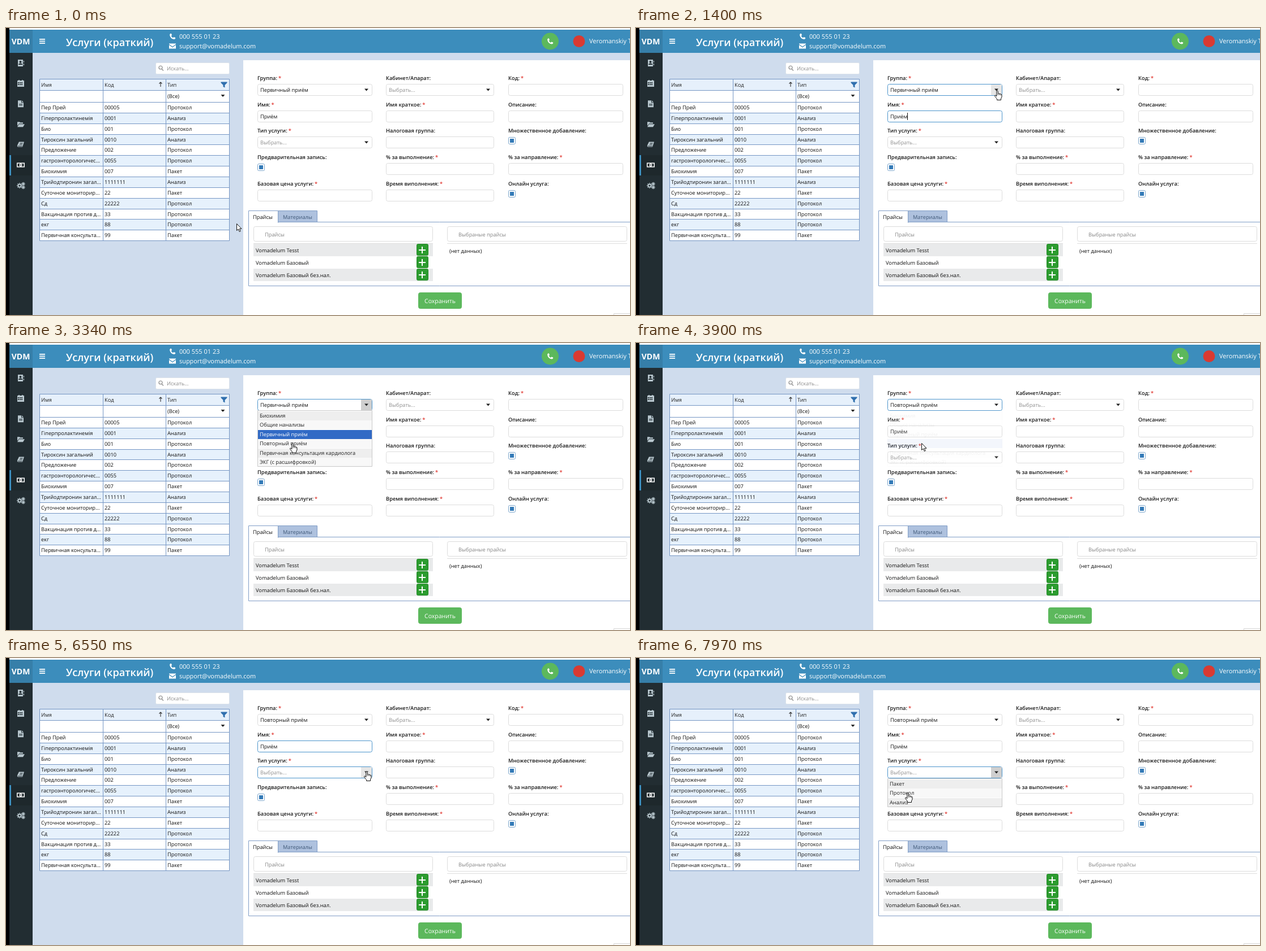
An HTML page with a canvas that plays this animation: 1102 px wide and 508 px high, repeating every 8 s.

```html
<!DOCTYPE html>
<html lang="ru">
<head>
<meta charset="utf-8">
<title>Услуги</title>
<style>
html, body { margin: 0; width: 100%; height: 100%; overflow: hidden; background: #fff; }
canvas { display: block; width: 1102px; height: 508px; }
</style>
</head>
<body>
<canvas id="stage" width="1102" height="508"></canvas>
<script>
const ctx = document.getElementById('stage').getContext('2d');
const LOOP = 8000, BLUE = '#3c8dbc', FOCUS = '#4b94cb', LINE = '#dcdcdc', GRID = '#7596c4';

function rect(x, y, w, h, color) {
  ctx.fillStyle = color;
  ctx.fillRect(x, y, w, h);
}

function box(x, y, w, h, fill, border, radius = 0) {
  ctx.beginPath();
  ctx.roundRect(x + .5, y + .5, w - 1, h - 1, radius);
  if (fill) { ctx.fillStyle = fill; ctx.fill(); }
  if (border) { ctx.strokeStyle = border; ctx.lineWidth = 1; ctx.stroke(); }
}

// y is the middle of the capital letters
function text(s, x, y, color = '#111', size = 9.25, weight = 400, align = 'left') {
  ctx.font = `${weight} ${size}px "Open Sans", "Noto Sans", sans-serif`;
  ctx.textAlign = align;
  ctx.fillStyle = color;
  ctx.fillText(s, x, y + size * .36);
  return ctx.measureText(s).width;
}

function shape(path, x, y, fill, stroke, width = 1) {
  ctx.save();
  ctx.translate(x, y);
  const p = new Path2D(path);
  if (fill) { ctx.fillStyle = fill; ctx.fill(p, 'evenodd'); }
  if (stroke) { ctx.strokeStyle = stroke; ctx.lineWidth = width; ctx.stroke(p); }
  ctx.restore();
}

function disc(x, y, r, color) {
  ctx.beginPath();
  ctx.arc(x, y, r, 0, 7);
  ctx.fillStyle = color;
  ctx.fill();
}

const caretDown = (x, y) => shape('M-3.5-2H3.5L0 2Z', x, y, '#222');
const HANDSET = 'M-5-3Q-4-6-2-5L-1-2-2.5-1Q-1 1.5 1 2.5L2.2 1 5 2Q6 4 3 5Q-4 4-5-3Z';

const MENU = [
  'M-5-6H4V6H-5ZM5-4H6V-1H5ZM5 1H6V4H5ZM-2.5-2A2 2 0 0 0 1.5-2A2 2 0 0 0-2.5-2M-4 3H3Q3 .5-.5.5Q-4 .5-4 3Z',
  'M-6-5H-4V-6H-2V-5H2V-6H4V-5H6V6H-6ZM-5-2V0H-3V-2ZM-2-2V0H0V-2ZM1-2V0H3V-2ZM-5 1V3H-3V1ZM-2 1V3H0V1ZM1 1V3H3V1Z',
  'M-5-6H1V-2H5V6H-5ZM2-6L5-3H2ZM-3 0V1H3V0ZM-3 2V3H3V2Z',
  'M-6-4H-2L-1-3H4V-1H-3L-6 3ZM-3 0H7L4 5H-6Z',
  'M-3-5H6L3 4H-5Q-7 3-5.5 0ZM-1-3L-1.4-2H3.4L3.8-3ZM-2-.8L-2.3 0H2.6L3-.8ZM-5 2V3H2.4L2.8 2Z',
  'M-7-4H7V4H-7ZM-5.5-2.5V2.5H5.5V-2.5ZM-2.5 0A2.5 2.5 0 0 0 2.5 0A2.5 2.5 0 0 0-2.5 0M-.5-1.5H.5V1.5H-.5Z'
];

function gear(x, y, r) {
  ctx.strokeStyle = '#b8c7ce';
  ctx.lineWidth = 2;
  ctx.beginPath();
  ctx.arc(x, y, r - 1, 0, 7);
  ctx.stroke();
  ctx.lineWidth = 1.3;
  for (let i = 0; i < 8; i++) {
    const c = Math.cos(i * Math.PI / 4), s = Math.sin(i * Math.PI / 4);
    ctx.beginPath();
    ctx.moveTo(x + c * r, y + s * r);
    ctx.lineTo(x + c * (r + 1.3), y + s * (r + 1.3));
    ctx.stroke();
  }
}

function drawFrame() {
  rect(0, 0, 1102, 508, '#cfdced');
  rect(0, 0, 1102, 3, '#fff');
  rect(6, 3, 1096, 41, BLUE);
  rect(6, 3, 41, 41, '#367fa9');
  rect(6, 44, 41, 464, '#222d32');
  rect(0, 0, 6, 508, '#000');
  text('VDM', 26, 23.5, '#fff', 14, 700, 'center');
  for (let i = 0; i < 3; i++) rect(59, 19 + i * 3.5, 10, 1.8, '#fff');
  text('Услуги (краткий)', 106, 25, '#fff', 18.2, 600);
  shape(HANDSET, 294, 15, '#fff');
  text('000 555 01 23', 306, 15.5, '#fff', 11);
  shape('M-6-4.5H6V-3.5L0 1-6-3.5ZM-6-2L0 2.4 6-2V4.5H-6Z', 294, 32, '#fff');
  text('support@vomadelum.com', 306, 32, '#fff', 10.9);
  disc(961, 23.5, 15, '#5cb85c');
  shape(HANDSET, 961, 23.5, '#fff');
  disc(1012, 23.5, 10.5, '#d93a32');
  text('Veromanskiy T', 1030, 23.5, '#fff', 11);

  rect(6, 225, 41, 36, '#1e282c');
  rect(6, 225, 3, 36, BLUE);
  MENU.forEach((p, i) => shape(p, 26, 62 + i * 36.1, i === 5 ? '#fff' : '#b8c7ce'));
  gear(24, 279, 3.6);
  gear(30.5, 276, 1.9);
  gear(30.5, 282, 1.9);
}

const ROWS = [
  ['Пер Прей', '00005', 'Протокол'], ['Гіперпролактинемія', '0001', 'Анализ'],
  ['Био', '001', 'Протокол'], ['Тироксин загальний', '0010', 'Анализ'],
  ['Предложение', '002', 'Протокол'], ['гастроэнторологичес...', '0055', 'Протокол'],
  ['Биохимия', '007', 'Пакет'], ['Трийодтиронин загал...', '1111111', 'Анализ'],
  ['Суточное мониторир...', '22', 'Пакет'], ['Сд', '22222', 'Протокол'],
  ['Вакцинация против д...', '33', 'Протокол'], ['екг', '88', 'Протокол'],
  ['Первичная консульта...', '99', 'Пакет']
];

function drawTable() {
  box(264, 61, 131, 21, '#fff', '#dbe2ea', 2);
  shape('M3-1A3 3 0 1 0-3-1A3 3 0 1 0 3-1M2 1.5L5 4.5', 273, 71, null, '#8a8a8a', 1.2);
  text('Искать...', 284, 72, '#8a8a8a');

  const cols = [62, 174, 285], step = 18.85;
  rect(59, 91, 336, 285, '#fff');
  rect(59, 91, 336, 19, '#e6f0fb');
  ['Имя', 'Код', 'Тип'].forEach((s, i) => text(s, cols[i], 101, '#222'));
  shape('M0 4V-4M-2.5-1.5L0-4 2.5-1.5', 273, 100, null, '#333', 1.1);
  shape('M-5.5-5H5.5V-3.5L1.5 .5V5L-1.5 3.5V.5L-5.5-3.5Z', 385, 100.5, '#2f6fae');
  text('(Все)', 285, 120.5);
  caretDown(383, 120);
  ROWS.forEach((row, i) => {
    const y = Math.round(131 + i * step);
    if (i % 2) rect(59, y, 336, 19, '#e6f1fc');
    rect(59, y, 336, 1, GRID);
    row.forEach((s, c) => text(s, cols[c], y + 10));
  });
  rect(59, 110, 336, 1, GRID);
  rect(171, 91, 1, 285, GRID);
  rect(282, 91, 1, 285, GRID);
  box(59, 90, 336, 287, null, GRID);
}

const COLS = [[444, 203], [671, 191], [887, 203]];
const rowTop = r => Math.round(99 + r * 46.7);

function label(s, c, r, required) {
  const x = COLS[c][0], y = 88.5 + r * 46.75;
  const w = text(s, x, y, '#1a1a1a', 9.3, 600);
  if (required) text('*', x + w + 2, y, '#e0332c', 9.3, 600);
}

function field(c, r, value = '', o = {}) {
  const [x, w] = COLS[c], y = rowTop(r);
  box(x, y, w, 21, '#fff', o.active ? FOCUS : LINE, 3);
  if (o.button) rect(x + w - 20, y + 1, 19, 19, o.button);
  if (o.combo) caretDown(x + w - 10.5, y + 10.5);
  text(value, x + 5, y + 11, o.hint ? '#8f8f8f' : '#111');
}

function check(c, r) {
  const x = COLS[c][0], y = rowTop(r) + 1;
  box(x, y, 13, 13, '#fff', '#7ba5cb', 2);
  rect(x + 3, y + 3, 7, 7, '#337ab7');
}

function drawList(x, y, items, selected, alpha) {
  const step = 16.5, h = items.length * step;
  ctx.globalAlpha = alpha;
  rect(x, y, 203, h + 1, '#fff');
  items.forEach((s, i) => {
    const on = i === selected, top = Math.round(y + .5 + i * step);
    rect(x, top, 203, 16, on ? '#316ac5' : i % 2 ? '#f8f8f8' : '#eeeeee');
    text(s, x + 4, y + 8.5 + i * step, on ? '#fff' : '#222');
  });
  box(x, y - 1, 203, Math.round(h) + 1, null, '#c9c9c9');
  ctx.globalAlpha = 1;
}

const GROUPS = ['Биохимия', 'Общие нанализы', 'Первичный приём', 'Повторный приём',
  'Первичная консультация кардиолога', 'ЭКГ (с расшифровкой)'];
const TYPES = ['Пакет', 'Протокол', 'Анализ'];
const within = (t, a, b) => t >= a && t < b;

function drawForm(t) {
  rect(419, 57, 683, 451, '#fff');
  label('Группа:', 0, 0, true);
  label('Кабинет/Апарат:', 1, 0);
  label('Код:', 2, 0, true);
  label('Имя:', 0, 1, true);
  label('Имя краткое:', 1, 1, true);
  label('Описание:', 2, 1);
  label('Тип услуги:', 0, 2, true);
  label('Налоговая группа:', 1, 2);
  label('Множественное добавление:', 2, 2);
  label('Предварительная запись:', 0, 3);
  label('% за выполнение:', 1, 3, true);
  label('% за направление:', 2, 3, true);
  label('Базовая цена услуги:', 0, 4, true);
  label('Время виполнения:', 1, 4, true);
  label('Онлайн услуга:', 2, 4);

  const groupButton = within(t, 1530, 3760) ? '#cfcfcf' : within(t, 1100, 1530) && '#e6e6e6';
  const picked = t < 3620 ? 2 : 3;
  field(0, 0, GROUPS[picked], { combo: true, active: within(t, 1100, 4730), button: groupButton });
  field(1, 0, 'Выбрать...', { combo: true, hint: true });
  field(0, 1, 'Приём', { active: within(t, 290, 1530) || within(t, 4730, 6840) });
  const typeButton = t >= 6840 ? '#cfcfcf' : t >= 6270 && '#e6e6e6';
  field(0, 2, 'Выбрать...', { combo: true, hint: true, active: t >= 6270, button: typeButton });
  [[2, 0], [1, 1], [2, 1], [1, 2], [1, 3], [2, 3], [0, 4], [1, 4]].forEach(([c, r]) => field(c, r));
  check(2, 2);
  check(0, 3);
  check(2, 4);

  const caret = [[290, 830], [1400, 1530], [4730, 5290], [5840, 6410]];
  if (caret.some(([a, b]) => within(t, a, b))) rect(479, 150, 1, 13, '#111');

  const alpha = within(t, 1530, 3760) ? 1 : within(t, 3760, 3900) ? .5 : within(t, 3900, 4040) ? .06 : 0;
  if (alpha) drawList(444, 120, GROUPS, picked, alpha);
  if (t >= 6840) drawList(444, 214, TYPES, -1, 1);
}

function drawPrices() {
  const edge = '#809dc6';
  box(428, 343, 680, 114, '#fff', edge);
  box(480, 323, 70, 21, '#aec1de', edge);
  box(428, 323, 53, 22, '#fff', edge);
  rect(429, 343, 51, 3, '#fff');
  text('Прайсы', 436, 334.5);
  text('Материалы', 489, 334.5, '#3f5878');

  box(437, 351, 317, 27, '#fff', LINE, 3);
  text('Прайсы', 457, 365.5, '#858585');
  box(779, 351, 318, 27, '#fff', LINE, 3);
  text('Выбраные прайсы', 799, 365.5, '#858585');
  rect(779, 381, 318, 1, '#dedede');
  text('(нет данных)', 783, 394.5);

  ['Tesst', 'Базовый', 'Базовый без.нал.'].forEach((s, i) => {
    const y = 382 + i * 22;
    rect(437, y, 317, 22, i % 2 ? '#fff' : '#e9eaeb');
    text('Vomadelum ' + s, 441, y + 11.5);
    box(725, y, 21, 21, '#2c9c2f', '#238a27', 2);
    rect(729, y + 10, 12, 2, '#fff');
    rect(734, y + 5, 2, 12, '#fff');
  });
  rect(437, 381, 317, 1, '#dedede');

  box(728, 468, 77, 29, '#5cb85c', '#5cb85c', 3);
  text('Сохранить', 766.5, 483, '#fff', 10.5, 400, 'center');
  box(1073, 505, 40, 10, '#fff', '#d5d5d5');
}

// time, x, y, kind: a = arrow, h = hand, i = text beam
const POINTER = [
  [0, 407, 346, 'a'], [150, 440, 240, 'a'], [290, 492, 157, 'i'], [420, 500, 157, 'i'],
  [560, 522, 152, 'i'], [690, 562, 124, 'a'], [830, 604, 97, 'a'], [960, 630, 90, 'a'],
  [1100, 636, 104, 'h'], [1250, 638, 109, 'h'], [1400, 638, 110, 'h'], [1810, 639, 110, 'h'],
  [2090, 636, 125, 'h'], [2230, 620, 160, 'h'], [2370, 590, 195, 'h'], [2510, 560, 208, 'h'],
  [2650, 530, 205, 'h'], [2780, 512, 195, 'h'], [2920, 506, 184, 'h'], [3060, 505, 178, 'h'],
  [3210, 506, 177, 'h'], [3760, 504, 177, 'a'], [4040, 504, 174, 'a'], [4170, 502, 164, 'i'],
  [4320, 499, 160, 'i'], [4460, 497, 158, 'i'], [4590, 495, 157, 'i'],
  [5290, 540, 157, 'i'], [5430, 581, 157, 'i'], [5840, 590, 163, 'i'], [5980, 603, 176, 'a'],
  [6120, 619, 191, 'a'], [6270, 632, 199, 'h'], [6410, 636, 200, 'h'], [6550, 637, 200, 'h'],
  [7270, 630, 205, 'h'], [7410, 600, 222, 'h'], [7550, 556, 233, 'h'], [7690, 516, 237, 'h'],
  [7830, 490, 238, 'h'], [7970, 480, 238, 'h']
];
const ARROW = 'M.5.5V12.5L3.3 10 5.2 14.5 7.2 13.6 5.3 9.3H9Z';
const HAND = 'M-1.2 11V1.5Q0-.3 1.2 1.5V6Q2.8 5 3.8 6.5Q5.4 5.8 6.2 7.2Q8 6.8 8 8.5V12L6.5 15V17.5H-.5V15.5L-4.5 10.5Q-4.6 8.4-2.8 9.2Z';

function drawPointer(t) {
  const [, x, y, kind] = POINTER.findLast(p => p[0] <= t);
  if (kind === 'a') shape(ARROW, x, y, '#fff', '#111');
  else if (kind === 'h') {
    shape(HAND, x, y, '#fff', '#111');
    shape('M1.2 6V9M3.8 6.5V9M6.2 7.5V9.5', x, y, null, '#111', .8);
  } else shape('M-3-6H-1L0-5 1-6H3M0-5V5M-3 6H-1L0 5 1 6H3', x, y, null, '#111', 1.1);
}

function draw() {
  const t = performance.now() % LOOP;
  ctx.textRendering = 'geometricPrecision';
  drawFrame();
  drawTable();
  drawForm(t);
  drawPrices();
  drawPointer(t);
  requestAnimationFrame(draw);
}
draw();
</script>
</body>
</html>
```
